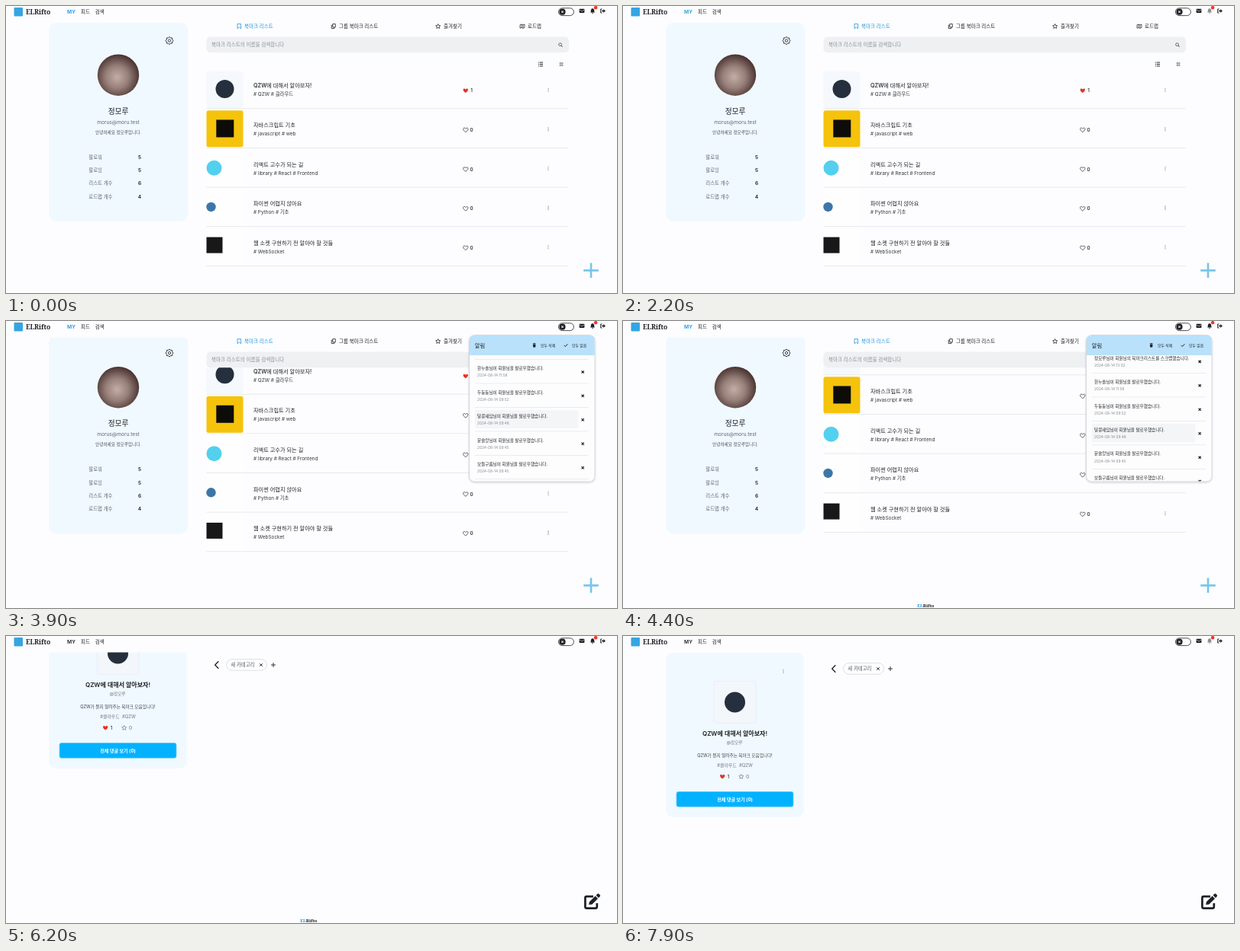
Write an HTML page that moves like this. It is 800x377 px and loops after 8000 ms.

```html
<!DOCTYPE html>
<html lang="ko">
<head>
<meta charset="utf-8">
<style>
html, body { margin: 0; width: 100%; height: 100%; overflow: hidden; background: #fdfdff; }
svg { display: block; width: 800px; height: 377px; font-family: Inter, "Noto Sans CJK KR", "Noto Sans CJK", sans-serif; }
.brand { font-family: "Noto Serif", serif; font-weight: 900; }
</style>
</head>
<body>
<svg id="stage" viewBox="0 0 800 377"></svg>
<script>
const BG = '#fdfdff', INK = '#1d2024', GREY = '#74787d', BLUE = '#2196dc', CARD = '#f0f9ff', NAVY = '#252f3e';
const USER = '정모루', TOPIC = 'QZW';
const $ = id => document.getElementById(id);

// Text is placed by its vertical centre.
const text = (x, y, s, size, fill = INK, more = '') =>
  `<text x="${x}" y="${y}" dy=".36em" font-size="${size}" fill="${fill}" ${more}>${s}</text>`;
const MID = 'text-anchor="middle"', W5 = 'font-weight="500"', W6 = 'font-weight="600"';
const rect = (x, y, w, h, fill, r = 0, more = '') =>
  `<rect x="${x}" y="${y}" width="${w}" height="${h}" rx="${r}" fill="${fill}" ${more}/>`;
const circle = (x, y, r, fill, more = '') => `<circle cx="${x}" cy="${y}" r="${r}" fill="${fill}" ${more}/>`;
const solid = (x, y, d, fill = INK) => `<path transform="translate(${x} ${y})" d="${d}" fill="${fill}"/>`;
const line = (x, y, d, color = INK, w = 0.8) =>
  `<path transform="translate(${x} ${y})" d="${d}" fill="none" stroke="${color}" stroke-width="${w}" stroke-linejoin="round"/>`;
const group = (id, body, more = '') => `<g id="${id}" ${more}>${body}</g>`;
const repeat = (n, f) => Array.from({ length: n }, (_, i) => f(i)).join('');

const spikes = (n, r1, r2) => 'M' + Array.from({ length: 2 * n }, (_, i) => {
  const a = Math.PI * i / n - Math.PI / 2, r = i % 2 ? r2 : r1;
  return `${(r * Math.cos(a)).toFixed(2)} ${(r * Math.sin(a)).toFixed(2)}`;
}).join('L') + 'Z';
const HEART = 'M0 2.8C-6 -1 -2 -4.6 0 -1.6C2 -4.6 6 -1 0 2.8Z';
const STAR = spikes(5, 3.2, 1.5);
const cross = r => `M${-r} ${-r}L${r} ${r}M${r} ${-r}L${-r} ${r}`;
const plus = r => `M${-r} 0H${r}M0 ${-r}V${r}`;
const dots = (x, y) => [-2, 0, 2].map(d => circle(x, y + d, 0.55, '#666')).join('');

const header = rect(0, 0, 800, 21.5, BG)
  + rect(10.5, 2, 11.5, 11.5, '#35a5e2', 1)
  + text(26, 7.5, 'ELRifto', 8.5, INK, 'class="brand"')
  + text(80, 7.5, 'MY', 6.7, INK, W6 + ' id="navMy"')
  + text(98, 7.5, '피드', 6.5, INK, W5) + text(116.8, 7.5, '검색', 6.5, INK, W5)
  + rect(723.4, 2.8, 20, 9.8, '#fff', 4.9, `stroke="${INK}" stroke-width=".8"`)
  + circle(728.5, 7.7, 4.1, INK) + line(728.5, 7.7, cross(1.4), '#ddd', 0.8) + circle(728.5, 7.7, 1.1, '#ddd')
  + rect(750.6, 3.8, 6.8, 5.2, INK, 0.8) + line(754, 5, 'M-3.2 0L0 2L3.2 0', BG, 0.6)
  + group('bell', solid(768, 6.5, 'M0 -3.3C1.6 -3 2.2 -2 2.2 -.6C2.2 1 2.6 1.4 3 2.1H-3C-2.6 1.4 -2.2 1 -2.2 -.6C-2.2 -2 -1.6 -3 0 -3.3ZM-.9 2.6H.9A.9 .9 0 0 1 -.9 2.6Z'))
  + circle(772.1, 2.2, 2.3, '#f0392f')
  + line(781.5, 6.5, 'M-1 -2.5H-2.8V2.5H-1', INK, 1) + solid(781.5, 6.5, 'M-1.5 -.8H.7V-2.5L3.4 0L.7 2.5V.8H-1.5Z');

const stats = [['팔로워', 5], ['팔로잉', 5], ['리스트 개수', 6], ['로드맵 개수', 4]];
const profile = rect(56, 22, 182.5, 261, CARD, 11)
  + line(214, 45.5, spikes(8, 5, 4), INK, 0.9) + circle(214, 45.5, 1.7, 'none', `stroke="${INK}" stroke-width=".8"`)
  + circle(147, 90.7, 27.2, 'url(#photo)')
  + text(147, 138.3, USER, 9.7, INK, MID + W5)
  + text(147, 152.5, 'morus@moru.test', 6.6, '#62666b', MID)
  + text(147, 165.5, `안녕하세요 ${USER}입니다.`, 5.6, '#4a4d52', MID)
  + stats.map(([s, n], i) => text(108.3, 198.4 + 17.3 * i, s, 6.4, '#62666b')
    + text(175, 198.4 + 17.3 * i, n, 6.6, INK, MID + W6)).join('');

const rows = [
  [TOPIC + '에 대해서 알아보자!', `# ${TOPIC} # 클라우드`, '#f5f8fd', circle(286.5, 109, 12, NAVY)],
  ['자바스크립트 기초', '# javascript # web', '#f5c30b', rect(275.3, 97.8, 23, 23, '#0d0c08')],
  ['리액트 고수가 되는 길', '# library # React # Frontend', '#fefefe', circle(272.5, 109.5, 10, '#53d0ee')],
  ['파이썬 어렵지 않아요', '# Python # 기초', '#fefefe', circle(268.5, 109, 6.2, '#3c76a8')],
  ['웹 소켓 구현하기 전 알아야 할 것들', '# WebSocket', '#fefefe', rect(262.5, 97, 21, 21, '#181818')]
];
const list = [-3, 0, 3].map(d => line(700, 76.5, `M-3 ${d * .8}H-1.8M-1 ${d * .8}H3`, INK, 1)).join('')
  + line(727, 76.5, 'M-2 -2H-.5V-.5H-2ZM.6 -2H2.1V-.5H.6ZM-2 .6H-.5V2.1H-2ZM.6 .6H2.1V2.1H.6Z', '#666', 0.6)
  + rows.map(([title, tags, tile, mark], i) => `<g transform="translate(0 ${51.65 * i})">`
    + rect(262.5, 85.7, 48, 48, tile, 2.5) + mark
    + rect(262.5, 134.4, 474, 0.8, '#e4e5e8')
    + text(324, 104.7, title, 7.2, INK, W5) + text(324, 116, tags, 6.4, '#33363a')
    + (i ? line(601.8, 111.2, HEART, INK, 0.7) : solid(601.8, 111.2, HEART, '#e23328'))
    + text(609.6, 111, i ? 0 : 1, 6.4, INK, MID + W5) + dots(710, 110.2) + '</g>').join('');

const tabs = rect(250, 21, 495, 40, BG)
  + line(305.3, 26.6, 'M-2.3 -3H2.3V3.1L0 1.2L-2.3 3.1Z', BLUE) + text(312, 26.8, '북마크 리스트', 6.5, BLUE, W5)
  + line(428.8, 26.6, 'M-1 -3H2.5V1.3H-1ZM-1 -1.4H-2.6V3H1V1.3') + text(436, 26.8, '그룹 북마크 리스트', 6.5, INK, W5)
  + line(565.7, 26.8, STAR) + text(573, 26.8, '즐겨찾기', 6.5, INK, W5)
  + line(676, 26.6, 'M-3 -1.8L-1 -2.6L1 -1.8L3 -2.6V1.8L1 2.6L-1 1.8L-3 2.6ZM-1 -2.6V1.8M1 -1.8V2.6', INK, 0.7) + text(683, 26.8, '로드맵', 6.5, INK, W5)
  + rect(262.5, 40.5, 474.5, 20.7, '#eff0f2', 5)
  + text(269, 50.6, '북마크 리스트의 이름을 검색합니다', 6.5, '#8b8f95')
  + circle(725.6, 50.6, 1.9, 'none', 'stroke="#555" stroke-width=".9"') + line(727, 52, 'M0 0L1.8 1.8', '#555', 1);

const detail = rect(56, 22, 180.7, 216, CARD, 10) + dots(210, 46.3)
  + rect(119.3, 59.3, 54.7, 55, '#f3f7fb', 2, 'id="tile" stroke="#e4e8ec" stroke-width=".6"')
  + group('tileMark', circle(146.5, 87, 13.5, NAVY))
  + text(146.5, 127.7, TOPIC + '에 대해서 알아보자!', 8, INK, MID + W6)
  + text(146, 140.3, '@' + USER, 5.6, GREY, MID)
  + text(146.5, 156.6, TOPIC + '가 뭔지 알려주는 북마크 모음입니다!', 5.6, '#3f4348', MID)
  + text(146.5, 170.3, `#클라우드&#160; #${TOPIC}`, 5.9, GREY, MID)
  + solid(130.2, 184.8, HEART, '#e23328') + text(137.8, 184.7, 1, 6.6, INK, MID)
  + line(154.8, 184.8, STAR, GREY, 0.7) + text(163.2, 184.7, 0, 6.6, GREY, MID)
  + rect(70, 204.5, 153, 19.8, '#02b2ff', 2.5, 'stroke="#6ccdfa" stroke-width=".8"')
  + text(146.5, 214.5, '전체 댓글 보기 (0)', 6.1, '#fff', MID + ' font-weight="700"');

const category = line(276, 43, 'M2.3 -4.8L-2.3 0L2.3 4.8', INK, 1.3)
  + rect(288.6, 35.6, 53, 14.6, '#fff', 7.3, 'stroke="#cfd2d6" stroke-width=".7"')
  + text(294.3, 42.9, '새 카테고리', 6.4, '#55595e') + line(334, 43, cross(1.8), INK, 0.9)
  + line(350, 43, plus(3), INK, 0.9);

const pencil = line(757, 338, 'M12 4.2H3.2Q1.4 4.2 1.4 6V17.8Q1.4 19.6 3.2 19.6H15Q16.8 19.6 16.8 17.8V13', INK, 2.7)
  + solid(757, 338, 'M14.6 3.5L18 6.9L10.4 14.5L6.2 15.1L6.8 11.3ZM15.5 2.6L17.4 .8Q18.4 -.1 19.4 .9L20.6 2.1Q21.6 3.1 20.6 4.2L18.9 6Z');

const follow = '님이 회원님을 팔로우했습니다.';
const notes = [
  [USER + '님이 회원님의 북마크리스트를 좋아합니다.', '14:31'],
  [USER + '님이 회원님의 북마크리스트를 스크랩했습니다.', '13:02'],
  ['한누솔' + follow, '11:58'], ['두둥둥' + follow, '09:52'], ['달콩새담' + follow, '09:48'],
  ['문솔앙' + follow, '09:45'], ['보들구름' + follow, '09:45']
];
const PITCH = 31.45;
const panel = rect(606.5, 18.6, 164.5, 192.4, '#fdfdfe', 7, 'stroke="#d3d7dc" stroke-width="1" filter="url(#shadow)"')
  + '<g clip-path="url(#panelBody)">' + group('notes', rect(614, 0, 135.5, 24, '#f4f5f7', 2, 'id="hover"')
    + notes.map(([s, time], i) => `<g transform="translate(0 ${PITCH * i})">`
      + text(617, 61.3, s, 5.6, INK, W5) + text(617, 70.8, '2024-08-14 ' + time, 4.75, '#85898e')
      + line(755.2, 66, cross(1.6), INK, 1.2) + rect(614, 80.8, 149, 0.6, '#dfe1e4') + '</g>').join('')) + '</g>'
  + '<path d="M607 45V25.6Q607 19 613.6 19H764Q770.6 19 770.6 25.6V45Z" fill="#b9e1fb"/>'
  + text(613.8, 32, '알림', 7.3, INK, W5)
  + solid(691.7, 31.8, 'M-2.1 -2.4H-.8L-.5 -2.9H.5L.8 -2.4H2.1V-1.7H-2.1ZM-1.8 -1.3H1.8L1.5 2.8H-1.5Z')
  + text(700, 31.8, '모두 삭제', 4.85, INK, W5)
  + line(733, 31.8, 'M-2.3 .1L-.7 1.7L2.4 -1.6', INK, 1) + text(741, 31.8, '모두 읽음', 4.85, INK, W5);

$('stage').innerHTML = `<defs>
  <radialGradient id="photo" cx=".47" cy=".55" r=".6"><stop offset="0" stop-color="#c3ada4"/><stop offset=".45" stop-color="#98807a"/><stop offset="1" stop-color="#3a2422"/></radialGradient>
  <clipPath id="panelBody"><rect x="607" y="45" width="163.5" height="165.5"/></clipPath>
  <filter id="shadow" x="-10%" y="-10%" width="120%" height="120%"><feDropShadow dx="0" dy="1" stdDeviation="1.2" flood-opacity=".18"/></filter></defs>`
  + rect(0, 0, 800, 377, BG)
  + group('my', group('profile', profile) + group('list', list) + tabs + line(766, 347.3, plus(9.8), '#79c6e8', 2.7))
  + group('detail', group('detailCard', detail) + group('category', category) + pencil)
  + group('footer', text(396.3, 438, '<tspan fill="#2196dc">EL</tspan>Rifto', 5.9, INK, MID + ' class="brand"'))
  + header + group('panel', panel);

// Eased progress from a to b.
const ease = (t, a, b, p = 3) => 1 - (1 - Math.min(1, Math.max(0, (t - a) / (b - a)))) ** p;
const shift = (id, y) => $(id).setAttribute('transform', `translate(0 ${-y})`);
const show = (id, on) => $(id).style.display = on ? '' : 'none';

function draw(now) {
  const t = now % 8000, onDetail = t >= 5400;
  const scroll = 64 * (ease(t, 3800, 4180) - ease(t, 6220, 6620, 4));
  const noteScroll = 62 * (ease(t, 3620, 3880) - ease(t, 4340, 4800, 2.4));

  show('my', !onDetail);
  show('detail', onDetail);
  show('panel', t >= 2500 && !onDetail);
  shift('profile', Math.min(scroll, 3.5));
  shift('list', scroll);
  shift('detailCard', scroll);
  shift('category', Math.min(scroll, 5));
  shift('footer', scroll);

  const loaded = t >= 5600;
  $('tile').setAttribute('fill', loaded ? '#f3f7fb' : '#dfe1e3');
  show('tileMark', loaded);
  $('navMy').setAttribute('fill', onDetail ? INK : BLUE);
  $('bell').setAttribute('opacity', t >= 2000 && t < 2500 || t >= 7600 ? 0.5 : 1);

  shift('notes', noteScroll);
  const pointer = 147 - 79 * ease(t, 4450, 4800);
  const row = Math.floor((pointer + noteScroll - 53.3) / PITCH);
  $('hover').setAttribute('y', 53.3 + PITCH * row);
  show('hover', t >= 3600);
  requestAnimationFrame(draw);
}
draw(0);
</script>
</body>
</html>
```
